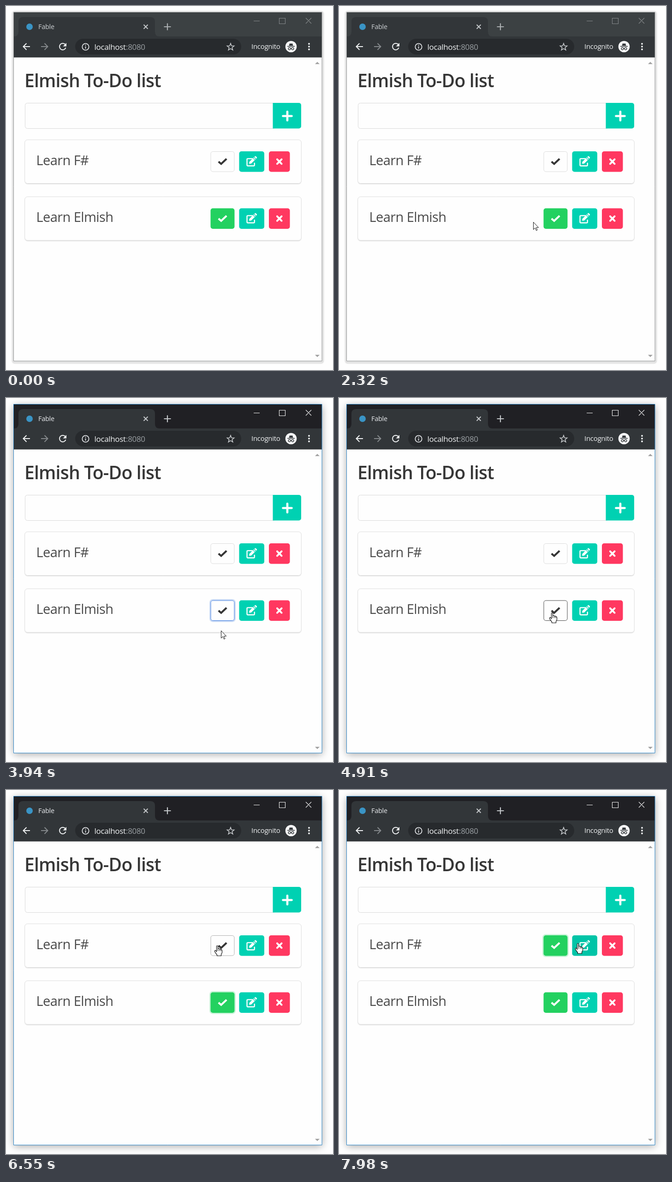
Write an HTML page with a canvas that moves like this. It is 709 px wide and 789 px high and loops after 8000 ms.

```html
<!DOCTYPE html>
<html lang="en">
<head>
<meta charset="utf-8">
<title>Elmish To-Do list</title>
<style>
  html, body { margin: 0; width: 709px; height: 789px; overflow: hidden; background: #fefefe; }
  canvas { display: block; }
</style>
</head>
<body>
<canvas id="stage" width="709" height="789"></canvas>
<script>
const ctx = document.getElementById('stage').getContext('2d');
const LOOP = 8000;
const GREEN = '#23d160', GREEN_HOVER = '#22c65b', TEAL = '#00d1b2', TEAL_HOVER = '#00c4a7';
const RED = '#ff3860', PAGE = '#fefefe';

// Pointer hotspot: time, x, y
const TRACK = [
  [270, 574, 772], [1020, 400, 608], [1440, 377, 515], [1900, 379, 481],
  [2250, 410, 470], [2560, 455, 463], [2680, 455, 463], [2850, 456, 463],
  [3050, 456, 463], [3500, 471, 508], [3840, 467, 508], [3940, 466, 504],
  [4400, 462, 470], [4680, 462, 465], [5060, 462, 465], [5740, 423, 412],
  [5870, 428, 396], [6400, 456, 338], [6550, 458, 337], [6680, 460, 336],
  [7270, 460, 336], [7980, 518, 332]
];

const CLICKS = [[2600, 2750], [4780, 4940], [6780, 6860]];
const BUTTONS = { check: [443.5, 52], edit: [505.5, 54.5], remove: [570, 45.5] };
const ROW_TOP = [315, 438.5];

const ARROW = new Path2D('M.5 .5V16.5L4.2 13L6.7 18.7L9 17.6L6.6 12.2H11.6Z');
const HAND = new Path2D('M-1.5 14V2Q-1.5 .5 0 .5Q1.5 .5 1.5 2V7Q4.5 5.5 5 8Q7.5 6.7 8 9' +
  'Q10.5 8.2 10.5 11V15Q10.5 17 8.5 19V22.5H-.5V20Q-4 16.5 -5.5 13Q-5.5 10 -3.5 10.7L-1.5 13Z');
const HAND_LINES = new Path2D('M1.5 7V12M5 8V12M8 9V12');
const PENCIL = new Path2D('M-5.7 4.8L-5.1 .6L4.7 -9.2L8.7 -5.3L-1.3 4.4Z' +
  'M5.7 -10.2L7 -11.5Q8 -12.3 9 -11.4L11 -9.4Q11.8 -8.5 11 -7.6L9.7 -6.3Z');
const STAR = new Path2D(Array.from({ length: 10 }, (_, i) => {
  const r = i % 2 ? 3.4 : 8, a = i * Math.PI / 5 - Math.PI / 2;
  return (i ? 'L' : 'M') + r * Math.cos(a) + ' ' + r * Math.sin(a);
}).join('') + 'Z');

function box(x, y, w, h, r, fill, stroke, width = 1) {
  ctx.beginPath();
  ctx.roundRect(x, y, w, h, r);
  paint(null, fill, stroke, width);
}

function paint(path, fill, stroke, width = 1) {
  const shape = path ? [path] : [];
  if (fill) { ctx.fillStyle = fill; ctx.fill(...shape); }
  if (stroke) { ctx.strokeStyle = stroke; ctx.lineWidth = width; ctx.stroke(...shape); }
}

const line = (d, color, width) => paint(new Path2D(d), null, color, width);
const shape = (d, color) => paint(new Path2D(d), color);

function circle(x, y, r, fill, stroke, width) {
  ctx.beginPath();
  ctx.arc(x, y, r, 0, 2 * Math.PI);
  paint(null, fill, stroke, width);
}

function label(str, x, y, size, color, weight = 400) {
  ctx.font = `${weight} ${size}px "Open Sans", "Noto Sans", sans-serif`;
  ctx.letterSpacing = `${-0.02 * size}px`;
  ctx.fillStyle = color;
  ctx.fillText(str, x, y);
}

function at(x, y, draw) {
  ctx.save();
  ctx.translate(x, y);
  draw();
  ctx.restore();
}

// Monotone cubic through the track, so rests stay still and nothing overshoots
function pointerAt(t) {
  if (t < TRACK[0][0]) return null;
  let i = TRACK.findIndex(p => p[0] > t) - 1;
  if (i < 0) i = TRACK.length - 2;
  const slope = (k, c) => k < 0 || k > TRACK.length - 2 ? 0 :
    (TRACK[k + 1][c] - TRACK[k][c]) / (TRACK[k + 1][0] - TRACK[k][0]);
  const tangent = (k, c) => {
    const a = slope(k - 1, c), b = slope(k, c);
    return a * b <= 0 ? 0 : 2 * a * b / (a + b);
  };
  const span = TRACK[i + 1][0] - TRACK[i][0];
  const u = (t - TRACK[i][0]) / span, v = 1 - u;
  const along = c => Math.round(
    TRACK[i][c] * v * v * (1 + 2 * u) + TRACK[i + 1][c] * u * u * (3 - 2 * u) +
    span * u * v * (v * tangent(i, c) - u * tangent(i + 1, c)));
  return { x: along(1), y: along(2) };
}

function drawWindow(focused) {
  if (focused) {
    ctx.save();
    ctx.shadowColor = 'rgba(0,0,0,.36)';
    ctx.shadowBlur = 16;
    ctx.shadowOffsetY = 3;
    box(17, 14, 668, 755, 0, PAGE);
    ctx.restore();
  } else {
    ctx.save();
    ctx.shadowColor = 'rgba(0,0,0,.12)';
    ctx.shadowBlur = 3;
    box(13, 11, 676, 764, 6, '#e3e3e3');
    ctx.restore();
  }
  box(17, 13, 668, 756, 0, PAGE);

  ctx.fillStyle = focused ? '#202024' : '#3c4143';
  ctx.fillRect(17, 13, 668, 53);
  ctx.fillStyle = '#323639';
  ctx.fillRect(17, 66, 668, 45.5);
  shape('M17 66Q27 66 27 56V34Q27 24 37 24H313Q323 24 323 34V56Q323 66 333 66Z', '#323639');
  box(16.5, 13.5, 668.5, 756, 0, null, focused ? '#2b85c7' : '#929495');

  circle(51, 45, 7, '#3a94c5');
  label('Fable', 70, 50, 14.5, focused ? '#e8eaed' : '#ccd0d3');
  line('M298.5 40.5L307.5 49.5M307.5 40.5L298.5 49.5', '#c3c6c9', 2);
  line('M342.5 45H357.5M350 37.5V52.5', focused ? '#c4c7ca' : '#abafb1', 2.2);

  const controls = focused ? '#f4f4f4' : '#85898b';
  line('M537 32.5H550M592.5 26.5H605.5V38.5H592.5ZM650 26L662 38M662 26L650 38', controls, 1.1);
}

function drawToolbar() {
  const light = '#f1f3f4';
  line('M52 88H37.5M44.5 81L37.5 88L44.5 95', light, 2);
  line('M76 88H90.5M83.5 81L90.5 88L83.5 95', '#85898c', 2);
  ctx.beginPath();
  ctx.arc(123, 88, 7, .35, -.75, false);
  paint(null, null, light, 2);
  shape('M131 80V87.5H123.5Z', light);

  box(150, 71, 360, 34, 17, '#272a2d');
  circle(172.5, 88.5, 7.2, null, '#dfe1e4', 1.8);
  line('M172.5 87.5V92.5M172.5 84.3V86.1', '#dfe1e4', 1.8);
  label('localhost', 191.5, 94.5, 17, light);
  label(':8080', 260, 94.5, 17, '#9ba0a4');
  at(487, 89, () => paint(STAR, null, '#c4c7ca', 1.6));

  label('Incognito', 532, 93, 15, light);
  circle(618, 88, 12.3, '#f8f9fa');
  shape('M613.5 86L615 81Q618 82 621 81L622.5 86Z', '#34383b');
  line('M610 87.5H626', '#34383b', 1.6);
  circle(614.5, 92.5, 2.4, null, '#34383b', 1.4);
  circle(621.5, 92.5, 2.4, null, '#34383b', 1.4);
  line('M616.9 92H619.1', '#34383b', 1.2);
  for (const y of [82, 88, 94]) circle(657, y, 1.9, light);
}

function drawPage() {
  label('Elmish To-Do list', 40, 175.5, 39, '#363636', 600);
  shape('M670 126H680L675 121ZM670 756H680L675 761Z', '#a3a3a3');

  box(41.5, 210.5, 540, 55, [5, 0, 0, 5], PAGE, '#d9d9d9');
  box(578.5, 210, 61.5, 55.5, [0, 5, 5, 0], TEAL);
  ctx.lineCap = 'round';
  line('M600.5 238.5H619.5M610 229V248', '#fff', 4.6);
  ctx.lineCap = 'butt';

  ['Learn F#', 'Learn Elmish'].forEach((task, row) => {
    const y = 290 + row * 123.5;
    ctx.save();
    ctx.shadowColor = 'rgba(10,10,10,.16)';
    ctx.shadowBlur = 2;
    ctx.shadowOffsetY = 1.5;
    box(41, y, 599, 94.5, 6, PAGE);
    ctx.restore();
    box(40.7, y, 599.6, 94.5, 6, PAGE, '#dedede');
    label(task, 65.5, 345 + row * 123, 29, '#4a4a4a');
  });
}

function drawButton(kind, row, pointer, state) {
  const [x, w] = BUTTONS[kind], y = ROW_TOP[row], h = 44.5;
  const hover = state.hover === kind && state.hoverRow === row;
  let fill, border, ink = '#fff', ring;

  if (kind === 'check') {
    const focus = state.focusRow === row;
    const ringed = focus && !state.pressed;
    if (state.done[row]) {
      fill = hover ? GREEN_HOVER : GREEN;
      ring = ringed && 'rgba(35,209,96,.25)';
    } else {
      fill = PAGE;
      ink = '#363636';
      ring = ringed && 'rgba(50,115,220,.25)';
      border = focus ? (state.pressed ? '#4a4a4a' : '#3273dc') : hover ? '#b0b0b0' : '#dbdbdb';
    }
  } else if (kind === 'edit') {
    fill = hover ? TEAL_HOVER : TEAL;
  } else {
    fill = RED;
  }

  if (ring) box(x - 1.25, y - 1.25, w + 2.5, h + 2.5, 6, null, ring, 2.5);
  box(x, y, w, h, 5, fill);
  if (border) box(x + .5, y + .5, w - 1, h - 1, 4.5, null, border);

  at(x + w / 2, y + h / 2, () => {
    if (kind === 'check') {
      line('M-8.7 .2L-3 5L8.7 -6', ink, 4.2);
    } else if (kind === 'edit') {
      line('M2.5 -6.4H-8.6Q-10.2 -6.4 -10.2 -4.8V7.6Q-10.2 9.2 -8.6 9.2H4.4Q6 9.2 6 7.6V2.6', ink, 2.4);
      paint(PENCIL, ink);
      line('M3 -7.6L7.2 -3.5', fill, 1.1);
    } else {
      ctx.lineCap = 'round';
      line('M-4.8 -4.8L4.8 4.8M4.8 -4.8L-4.8 4.8', ink, 4);
      ctx.lineCap = 'butt';
    }
  });
}

function drawPointer(pointer, isHand) {
  at(pointer.x, pointer.y, () => {
    ctx.lineJoin = 'round';
    paint(isHand ? HAND : ARROW, '#fff', '#111', isHand ? 1.2 : 1);
    if (isHand) paint(HAND_LINES, null, '#111', 1);
  });
}

function stateAt(t, pointer) {
  const state = {
    done: [t >= CLICKS[2][1], t < CLICKS[0][1] || t >= CLICKS[1][1]],
    pressed: CLICKS.some(([down, up]) => t >= down && t < up),
    focusRow: t < CLICKS[0][0] ? -1 : t < CLICKS[2][0] ? 1 : 0,
    hover: null,
    hoverRow: -1
  };
  if (pointer) {
    state.hoverRow = ROW_TOP.findIndex(y => pointer.y >= y && pointer.y < y + 44.5);
    if (state.hoverRow >= 0) {
      state.hover = Object.keys(BUTTONS).find(kind => {
        const [x, w] = BUTTONS[kind];
        return pointer.x >= x && pointer.x < x + w;
      });
    }
  }
  return state;
}

function render(t) {
  const pointer = pointerAt(t), state = stateAt(t, pointer);
  ctx.fillStyle = PAGE;
  ctx.fillRect(0, 0, 709, 789);
  drawWindow(t >= CLICKS[0][0]);
  drawToolbar();
  drawPage();
  for (const row of [0, 1]) {
    for (const kind of Object.keys(BUTTONS)) drawButton(kind, row, pointer, state);
  }
  if (pointer) drawPointer(pointer, !!state.hover);
}

const start = performance.now();
function tick() {
  render((performance.now() - start) % LOOP);
  requestAnimationFrame(tick);
}
tick();
</script>
</body>
</html>
```
